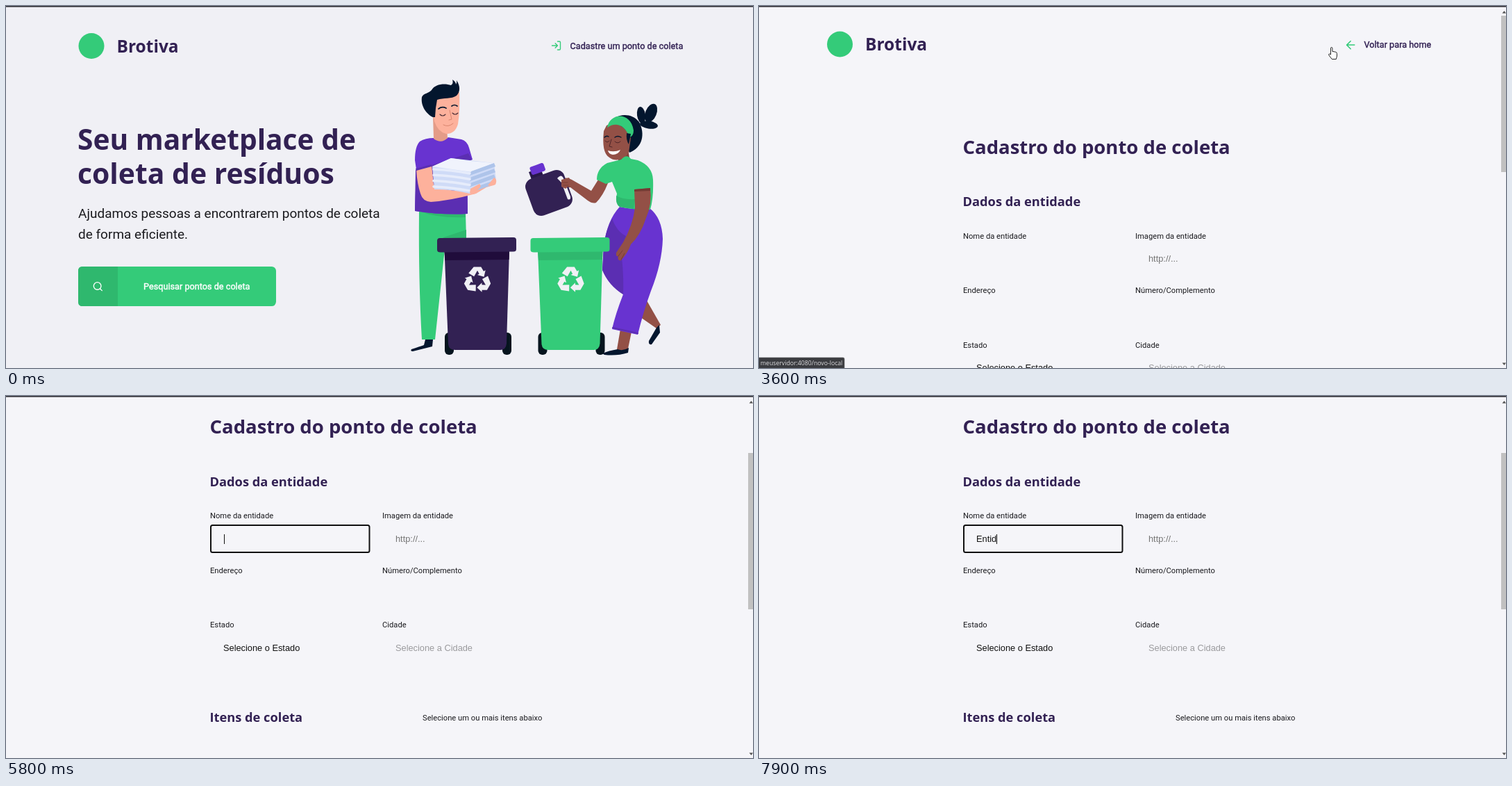
Recreate the animation shown at these times as an HTML page. Size 1076x521 px, loop 8 s.

```html
<!DOCTYPE html>
<html lang="pt-BR">
<head>
<meta charset="utf-8">
<title>Pontos de coleta</title>
<style>
html, body { margin: 0; width: 100%; height: 100%; overflow: hidden; background: #f0f0f5; }
svg { display: block; width: 100%; height: 100%; --navy: #071a35; --shade: #0a1733; }
text { font-family: Roboto, sans-serif; white-space: pre; }
.head { font-family: "Open Sans", "Noto Sans", sans-serif; font-weight: 700; }
.ui { font-family: "Open Sans", "Noto Sans", sans-serif; }
.input { font-family: "Liberation Sans", Arial, sans-serif; }
.fat { stroke-width: .4; }
.line { fill: none; stroke-linecap: round; stroke-linejoin: round; }
.navy { fill: var(--navy); }
</style>
</head>
<body>
<svg id="stage" viewBox="0 0 1076 521" xmlns="http://www.w3.org/2000/svg"></svg>
<script>
const INK = '#322153', GREEN = '#34cb79', MOSS = '#2fb86e', PURPLE = '#6833d0', PLUM = '#5b2eb2';
const SKIN = '#fdb19c', BROWN = '#935046', SCROLL = 158.5;

const text = (x, y, size, str, fill = '#1b1b1f', cls = '') =>
  `<text x="${x}" y="${y}" font-size="${size}" fill="${fill}" class="${cls}"` +
  `${cls === 'fat' ? ` stroke="${fill}"` : ''}>${str}</text>`;
const shape = (d, fill) => fill ? `<path d="${d}" fill="${fill}"/>` : `<path d="${d}" class="navy"/>`;
const line = (d, stroke, width = 1) =>
  `<path class="line" d="${d}" stroke="${stroke}" stroke-width="${width}"/>`;
const box = (x, y, w, h, fill, r = 0, more = '') =>
  `<rect x="${x}" y="${y}" width="${w}" height="${h}" rx="${r}" fill="${fill}" ${more}/>`;
const group = (id, inner) => `<g id="${id}">${inner}</g>`;
const at = (x, y, inner, scale = 1) => `<g transform="translate(${x} ${y}) scale(${scale})">${inner}</g>`;

const brand = (x, y) => at(x, y,
  `<circle cx="19" cy="18" r="18.5" fill="${GREEN}"/>` + text(55.5, 27, 24.5, 'Brotiva', INK, 'head'));

function papers() {
  let out = shape('M614 231L641 219L703 226L706 250L668 270Q640 263 617 264Z', '#cfdbf7') +
    shape('M614 231L641 219L668 223L703 226L671 239Z', '#f0f3fc');
  for (let i = 0; i < 4; i++) {
    const y = 231 + i * 8.3;
    out += shape(`M670 ${y + 7}L703 ${y - 5}L705 ${y}L668 ${y + 13}Z`, '#aec4ea');
    out += line(`M616 ${y + 4}Q642 ${y + 5} 668 ${y + 10}`, '#e6ecfb', 3.5);
  }
  return out;
}

const man = () =>
  shape('M595 294L662 297L663 336L632 350L618 480H599Q594 395 595 294Z', GREEN) +
  shape('M597 296L661 298L662 304Q625 306 597 296ZM630 333L663 322V337H630Z', MOSS) +
  shape('M604 480H615L614 490L586 497Q582 497 584 494Q596 490 602 488Z') +
  shape('M616 190Q627 198 637 189L656 192Q664 194 667 204L672 221L664 224L665 299Q628 301 589 295L591 235L589 222Q589 202 596 195Q604 190 616 190Z', PURPLE) +
  shape('M590 236L633 223L666 212L671 221L664 224L665 299Q628 301 589 295Z', PLUM) +
  shape('M615 158L616 191Q627 199 636 190L635 176Z', '#e49c88') +
  shape('M612 130L617 166Q622 181 634 184Q647 184 651 170Q654 150 653 124L630 122Z', SKIN) +
  shape('M615 160C606 156 597 144 599 131C602 125 609 126 613 121C618 112 632 111 641 114Q645 111 643 106Q648 109 648 113Q650 110 649 107C655 116 654 124 649 129C642 134 630 132 621 135L619 147L618 160Z') +
  line('M623 148Q628 144 634 147M642 144Q646 141 650 144', 'var(--navy)', 1.7) +
  line('M625 156Q629 160 633 156M643 154Q647 158 651 154', '#4d3038', 1.1) +
  line('M639 150L642 163L638 164M630 171Q637 175 644 169', '#d9856f') +
  shape('M591 235L613 229L616 257Q640 270 668 264L684 257Q704 245 706 251Q708 257 692 261L677 270Q640 280 612 282Q600 281 597 270Q592 255 591 235Z', SKIN) +
  shape('M590 234L613 228L613 231L591 237Z', PLUM) +
  papers() +
  shape('M669 263L682 256Q686 259 680 264L674 271L668 269ZM694 258L703 247Q708 249 705 257Q700 260 694 258Z', SKIN);

const woman = () =>
  shape('M923 424L943 459L937 464L914 448Z', BROWN) +
  shape('M941 459L942 470L930 487Q925 488 926 482L937 463Z') +
  shape('M885 465L901 469L896 493L884 499L880 494Z', BROWN) +
  shape('M859 500Q868 496 881 494Q888 497 897 492L896 499Q880 504 862 502Z') +
  shape('M884 289Q905 294 927 291Q945 305 946 335Q945 370 929 410Q918 440 910 473L873 465Q878 443 889 415Q868 402 859 380L861 345Q866 308 884 289Z', PURPLE) +
  shape('M873 306Q880 325 893 331L887 362Q890 390 889 415Q868 402 859 380L861 345Q864 322 873 306Z', PLUM) +
  '<g class="navy"><ellipse cx="929" cy="154" rx="8" ry="14" transform="rotate(22 929 154)"/>' +
  '<ellipse cx="915" cy="157" rx="6" ry="12" transform="rotate(-8 915 157)"/>' +
  '<ellipse cx="926" cy="171" rx="13" ry="5.5" transform="rotate(8 926 171)"/></g>' +
  shape('M868 172C874 155 900 151 912 167C921 184 917 204 898 211L888 190Z') +
  shape('M881 212L896 206L898 219Q889 227 882 222Z', '#7d4139') +
  shape('M861 180C859 200 861 213 869 218C878 225 891 221 897 211L900 190C890 168 874 167 865 172Z', BROWN) +
  shape('M866 175C870 153 900 152 904 179Q904 187 898 189C892 171 878 166 866 175Z', GREEN) +
  shape('M894 183L900 184L897 199Q893 193 894 183Z') +
  shape('M867 208Q876 211 885 207Q882 214 874 214Q868 213 867 208Z', '#fff') +
  line('M862 189Q865 186 868 188M877 189Q881 186 886 189', 'var(--navy)', 1.4) +
  line('M863 194Q866 198 869 194M877 195Q881 199 885 195M872 192L869 202L873 203', '#4d2528') +
  shape('M853 250L867 255Q860 273 850 283Q845 285 838 280L813 261L802 262L799 250Q807 245 815 250L843 266Z', BROWN) +
  shape('M866 226L886 221Q894 212 900 220L910 222Q931 230 932 250Q933 276 928 293Q905 294 884 289Q877 285 880 270L873 253L864 256L851 250Q851 234 866 226Z', GREEN) +
  shape('M879 273Q888 279 906 278L904 292L884 289Q878 285 879 273Z', MOSS) +
  shape('M905 264L928 262Q931 285 922 305Q914 330 900 343Q896 355 886 366Q880 367 882 360Q878 361 879 355L889 340Q903 315 906 290Z', BROWN) +
  shape('M905 264L928 262V266L905 267Z', '#743b34') +
  line('M874 463L910 471', PLUM, 2) + line('M882 360L888 352M886 365L891 356', '#743b34');

const jug = () =>
  `<g transform="rotate(-20 782 269)">${box(765, 231, 18, 18, '#28184a')}` +
  `${box(752.5, 241, 59, 56, INK, 12)}${box(768, 225, 21, 12, PURPLE, 2.5)}</g>` +
  shape('M794 248Q800 241 803 248L813 274Q814 280 809 278L800 254Z', '#f0f0f5') +
  shape('M800 250L811 247L815 255L806 263L800 260Z', BROWN) +
  line('M801 254H809M803 258H810', '#743b34', .8);

// three folded bands around the centre
const arrows = [0, 120, 240].map(a =>
  `<path transform="rotate(${a})" fill="#f0f0f5" d="M-5 -18H5L8.500 -12L11 -13.500L9 -4.500L0 -7L2.500 -8.500L0 -13L-4.500 -5L-12 -9.500Z"/>`).join('');

const bin = (x, fill, shade) => at(x, 333,
  box(11, 137, 13, 32, '#06141e', 6) + box(94, 137, 13, 32, '#06141e', 6) +
  shape('M10.5 18H104L100 153Q99 162 91 162H26Q17 162 16 154Z', fill) +
  shape('M10.5 20H104L103.6 32L11.5 33Z', shade) +
  shape('M4 1L110 0Q114 0 114 4V17Q114 20.5 110 20.5L5 21.5Q0 21.5 0 18V5Q0 1 4 1Z', fill) +
  at(58, 61.5, arrows, 1.06));

const home = () => box(0, 0, 1076, 521, '#f0f0f5') + brand(104, 39.5) +
  at(784.5, 49, line('M15 3h4a2 2 0 0 1 2 2v14a2 2 0 0 1-2 2h-4M10 17l5-5-5-5M15 12H3', GREEN, 2), .667) +
  text(812.5, 61.5, 12.7, 'Cadastre um ponto de coleta', INK, 'fat') +
  text(103, 207, 40.7, 'Seu marketplace de', INK, 'head') +
  text(103, 255.5, 40.9, 'coleta de resíduos', INK, 'head') +
  text(104, 304.5, 19, 'Ajudamos pessoas a encontrarem pontos de coleta') +
  text(104, 334.5, 19, 'de forma eficiente.') +
  box(104, 375, 285, 57, GREEN, 6.4) + shape('M161 375H110Q104 375 104 381V426Q104 432 110 432H161Z', MOSS) +
  at(124.3, 395.6, line('M19 11a8 8 0 1 1-16 0a8 8 0 1 1 16 0M21 21l-4.35-4.35', '#fff', 2), .667) +
  text(198, 408, 12.7, 'Pesquisar pontos de coleta', '#fff', 'fat') +
  man() + woman() + jug() + bin(621, INK, 'var(--shade)') + bin(755.5, GREEN, MOSS);

const formPage = () => brand(97.5, 37) +
  at(842.6, 46.5, line('M19 12H5M12 19l-7-7 7-7', GREEN, 1.9), .8) +
  text(871.5, 60, 12.7, 'Voltar para home', INK, 'fat') +
  text(293.5, 212.5, 27.5, 'Cadastro do ponto de coleta', INK, 'head') +
  text(293.5, 288, 18.25, 'Dados da entidade', INK, 'head') +
  [[334.5, 'Nome da entidade', 'Imagem da entidade'], [413, 'Endereço', 'Número/Complemento'], [491.5, 'Estado', 'Cidade']]
    .map(([y, a, b]) => text(294, y, 11.2, a) + text(542, y, 11.2, b)).join('') +
  text(561, 368, 12.8, 'http://...', '#757575', 'input') +
  text(313, 525, 12.8, 'Selecione o Estado', '#111', 'input') +
  text(561, 525, 12.8, 'Selecione a Cidade', '#9a9a9d', 'input') +
  text(293.5, 627.5, 18.25, 'Itens de coleta', INK, 'head') +
  text(600, 625.5, 11.2, 'Selecione um ou mais itens abaixo');

const entries = [
  ['Delvino das Matas Corvel', 'Rua Tomé Larvione'],
  ['Delvino Corvel', 'Rua Elvio Tarnes Jr, 284'],
  ['DELVINO DAS MATAS CORVEL', 'Rua Norvaldo Pirel'],
  ['Técnico de Tecnologia da Informação', 'Rua Norvaldo Pirel, 63']
];
const menu = () => box(293.5, 228, 231, 229, '#0003', 3) + box(294, 227, 229.5, 228, '#28292c', 2) +
  entries.map(([name, road], i) => text(303.5, 250.5 + 46 * i, 9.4, name, '#f1f1f3', 'head') +
    text(303.5, 267.5 + 46 * i, 9.3, road, '#e8e8ea', 'ui')).join('') +
  box(294, 423, 229.5, 1, '#414246') + text(303.5, 443, 9.5, 'Gerenciar endereços...', '#e8e8ea', 'ui');

const pointer = 'stroke="#111" stroke-width=".9" stroke-linejoin="round" fill="#fff"';
const stage = document.getElementById('stage');
stage.innerHTML = group('home', home()) +
  group('form', box(0, 0, 1076, 521, '#f5f5f9') + group('page', formPage()) +
    group('thumb', box(1069, 14, 7, 225, '#c1c1c1')) +
    shape('M1070.5 10.5H1076L1073.5 7ZM1070.5 513.5H1076L1073.5 517Z', '#505050')) +
  group('field', box(295, 186, 228.5, 39, 'none', 2.5, 'stroke="#101010" stroke-width="2"') +
    '<text id="typed" class="input" x="313" y="209.5" font-size="12.8" fill="#111"></text>' +
    box(0, 199, 1, 14, '#111', 0, 'id="caret"')) +
  group('menu', menu()) +
  group('status', box(-2, 506, 125, 18, '#3b3c40', 2, 'stroke="#6a6a6e" stroke-width=".7"') +
    text(2, 517.3, 8.7, 'meuservidor:4080/novo-local', '#dcdcde', 'ui')) +
  box(0, 0, 1076, 1.5, '#2b2b31') +
  group('cursor',
    `<path id="arrow" d="M.5 .5V12.8L3.3 10.3L5.3 15L7.3 14.1L5.3 9.5H9Z" ${pointer}/>` +
    `<path id="hand" d="M3.5 10V1.8Q3.5 .5 4.7 .5Q5.9 .5 5.9 1.8V6.3L10.5 7.2Q12.5 7.8 12.5 9.5V13L11.3 17.5H5.3L1 12Q.2 10.7 1.2 10Q2.2 9.5 3.5 11Z" ${pointer}/>`);

const el = Object.fromEntries([...stage.querySelectorAll('[id]')].map(e => [e.id, e]));
const show = (e, on) => e.setAttribute('visibility', on ? 'visible' : 'hidden');
const move = (e, x, y) => e.setAttribute('transform', `translate(${x} ${y})`);
const within = (t, a, b) => t >= a && t < b;

// time, x, y of the pointer tip
const track = [
  [900, 210, 61], [1600, 589.5, 233], [1700, 562, 306], [1800, 517, 343], [1900, 517, 343],
  [2800, 820, 59], [4000, 820, 59], [4400, 456, 297], [4500, 456, 297],
  [5100, 411, 247], [5200, 411, 247], [5300, 390, 225]
];
const typing = [[7200, 'E'], [7400, 'En'], [7500, 'Ent'], [7700, 'Enti'], [7900, 'Entid']];

const ease = (t, a, b) => {
  const k = Math.min(1, Math.max(0, (t - a) / (b - a)));
  return k * k * (3 - 2 * k);
};

function pointerAt(t) {
  const i = Math.max(1, track.findIndex(k => k[0] >= t));
  const [a, x, y] = track[i - 1], [b, u, v] = track[i];
  const k = ease(t, a, b);
  return [x + (u - x) * k, y + (v - y) * k];
}

function draw(t) {
  const onForm = t >= 3600;
  show(el.home, !onForm);
  show(el.form, onForm);
  stage.style.setProperty('--navy', t < 300 ? '#03162e' : '#071a35');
  stage.style.setProperty('--shade', t < 300 ? '#200c3b' : '#0a1733');

  const k = ease(t, 4500, 5100);
  move(el.page, 0, -SCROLL * k);
  move(el.thumb, 0, 68 * k);

  const seen = within(t, 900, 5400), link = within(t, 2800, 3700);
  show(el.arrow, seen && !link);
  show(el.hand, seen && link);
  if (seen) move(el.cursor, ...pointerAt(t));
  show(el.status, within(t, 2900, 3800));

  const word = typing.filter(s => s[0] <= t).pop();
  el.typed.textContent = word ? word[1] : '';
  show(el.field, t >= 5800);
  show(el.caret, t >= 5800 && !within(t, 6300, 6900));
  el.caret.setAttribute('x', word ? 313 + Math.round(el.typed.getComputedTextLength()) : 314);
  show(el.menu, within(t, 7200, 7400));
}

const start = performance.now();
function tick() {
  const t = (performance.now() - start) % 8000;
  draw(Math.floor(t / 100) * 100);
  requestAnimationFrame(tick);
}
tick();
</script>
</body>
</html>
```
